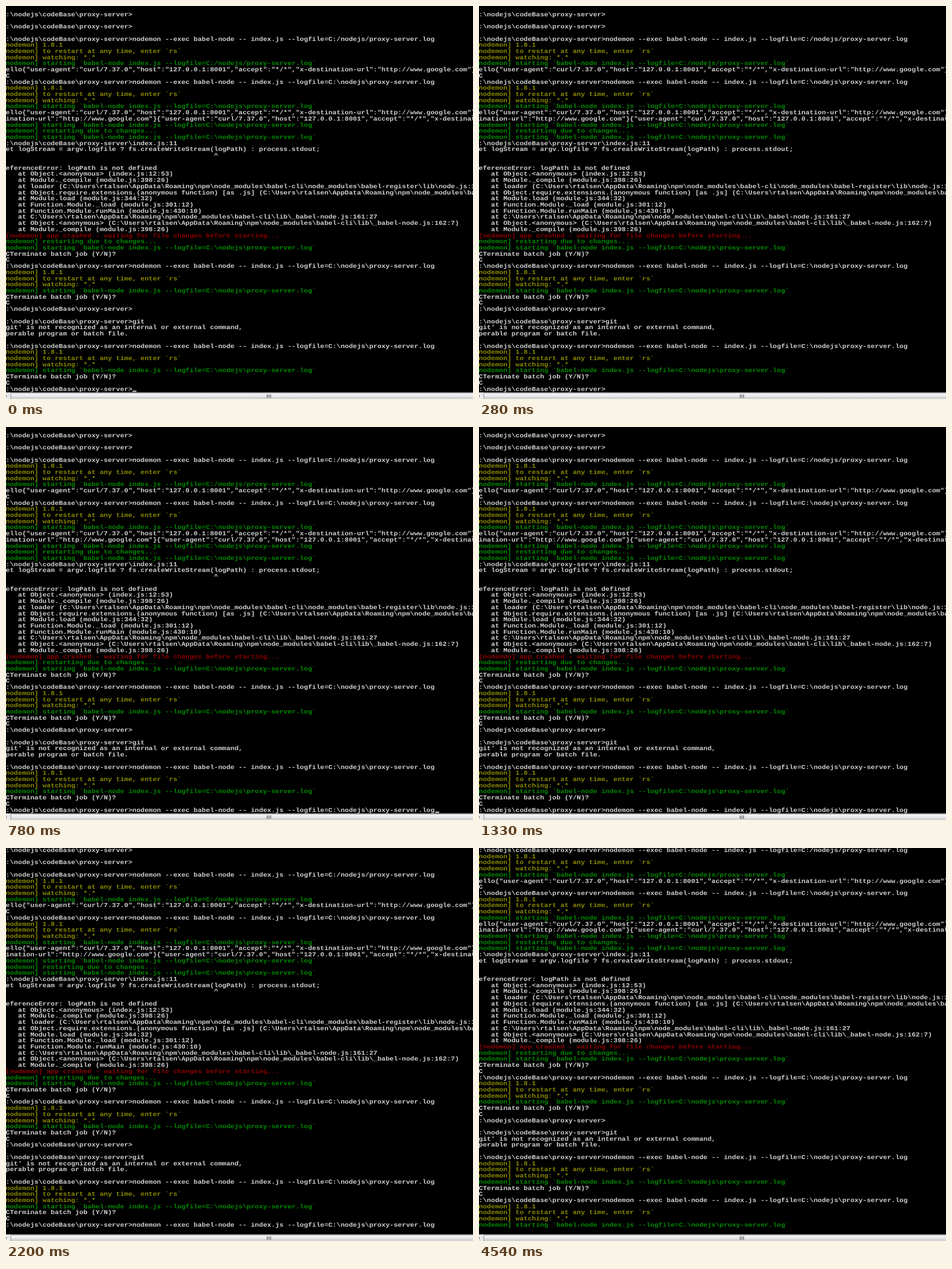
An HTML page that plays this animation: 816x686 px, repeating every 8 s.

```html
<!DOCTYPE html>
<html lang="en">
<head>
<meta charset="utf-8">
<title>Console</title>
<style>
  html, body { margin: 0; width: 100%; height: 100%; overflow: hidden; background: #000; }
  svg { display: block; width: 816px; height: 686px; }
  text {
    font: bold 11.908px "Liberation Mono", "DejaVu Sans Mono", monospace;
    white-space: pre;
    text-rendering: geometricPrecision;
  }
</style>
</head>
<body>
<svg viewBox="0 0 816 686" xmlns="http://www.w3.org/2000/svg">
  <defs>
    <linearGradient id="thumb" x2="0" y2="1">
      <stop offset="0" stop-color="#f6f6f6"/>
      <stop offset=".45" stop-color="#e8e8ea"/>
      <stop offset=".5" stop-color="#d8d8dc"/>
      <stop offset="1" stop-color="#c4c4c8"/>
    </linearGradient>
  </defs>
  <rect width="816" height="686" fill="#000"/>
  <g id="screen"></g>
  <rect id="cursor" y="671.4" width="7" height="2.1" fill="#d0d0d0"/>
  <g id="scrollbar">
    <rect y="674.5" width="816" height="12" fill="#e8e8ea"/>
    <rect x="8.5" y="675.5" width="820" height="14" rx="1.5" fill="url(#thumb)" stroke="#949498"/>
    <path d="M0 678.5V683.5L1.2 681Z" fill="#444"/>
    <path d="M456.5 678V684M459.5 678V684M462.5 678V684" stroke="#45454a" stroke-width="1.3"/>
    <path d="M457.7 678V684M460.7 678V684M463.7 678V684" stroke="#fff" stroke-width=".7"/>
  </g>
</svg>
<script>
const LOOP = 8000;
const COL = 7.146, ROW = 10.72, LEFT = -0.4, TOP = 8.75, BASE = 8.9;
const COLORS = { w: '#d0d0d0', y: '#8a8a00', g: '#008a00', r: '#8a0000' };
const raw = String.raw;

const prompt = raw`:\nodejs\codeBase\proxy-server>`;
const winLog = raw`--logfile=C:\nodejs\proxy-server.log`;
const unixLog = '--logfile=C:/nodejs/proxy-server.log';
const npm = raw`C:\Users\rtalsen\AppData\Roaming\npm\node_modules\babel-cli`;
const command = log => 'nodemon --exec babel-node -- index.js ' + log;
const request = '"user-agent":"curl/7.37.0","host":"127.0.0.1:8001","accept":"*/*",' +
  '"x-destination-url":"http://www.google.com"}';

const rows = [];
const put = (color, ...lines) => lines.forEach(line => rows.push([color, line]));
const say = (...lines) => put('w', ...lines);
const starting = (log = winLog) => put('g', 'nodemon] starting `babel-node index.js ' + log + '`');
const restarting = () => put('g', 'nodemon] restarting due to changes...');
const banner = log => {
  put('y', 'nodemon] 1.8.1', 'nodemon] to restart at any time, enter `rs`', 'nodemon] watching: *.*');
  starting(log);
};
const run = (log = winLog) => {
  say(prompt + command(log));
  banner(log);
};
const stop = () => say('CTerminate batch job (Y/N)?', 'C');
const trace = (...calls) => calls.forEach(call => say('   at ' + call));

say(prompt, '', prompt, '');
run(unixLog);
say('ello{' + request, 'C');
run();
say('ello{' + request, 'ination-url":"http://www.google.com"}{' + request);
starting();
restarting();
starting();
say(
  raw`:\nodejs\codeBase\proxy-server\index.js:11`,
  'et logStream = argv.logfile ? fs.createWriteStream(logPath) : process.stdout;',
  ' '.repeat(51) + '^',
  '',
  'eferenceError: logPath is not defined'
);
trace(
  'Object.<anonymous> (index.js:12:53)',
  'Module._compile (module.js:398:26)',
  'loader (' + npm + raw`\node_modules\babel-register\lib\node.js:128:5)`,
  'Object.require.extensions.(anonymous function) [as .js] (' + npm,
  'Module.load (module.js:344:32)',
  'Function.Module._load (module.js:301:12)',
  'Function.Module.runMain (module.js:430:10)',
  npm + raw`\lib\_babel-node.js:161:27`,
  'Object.<anonymous> (' + npm + raw`\lib\_babel-node.js:162:7)`,
  'Module._compile (module.js:398:26)'
);
put('r', '[nodemon] app crashed - waiting for file changes before starting...');
restarting();
starting();
stop();
run();
stop();
say(prompt, '', prompt + 'git',
  "git' is not recognized as an internal or external command,",
  'perable program or batch file.', '');
run();
stop();
const inputRow = rows.length;
run();

const screen = document.getElementById('screen');
const cursor = document.getElementById('cursor');

const lines = rows.map(([color, line], i) => {
  const el = document.createElementNS('http://www.w3.org/2000/svg', 'text');
  const y = TOP + i * ROW + BASE;
  // squat glyphs of the console's 8 by 12 cell
  el.setAttribute('transform', `translate(${LEFT} ${y.toFixed(2)}) scale(1 .89)`);
  el.setAttribute('fill', COLORS[color]);
  el.textContent = line;
  return screen.appendChild(el);
});

const show = (el, on) => el.setAttribute('visibility', on ? 'visible' : 'hidden');
const between = (t, from, to) => t >= from && t < to;

function draw(t) {
  const typed = t >= 650, started = t >= 4540;
  const scroll = started ? 5 : t >= 2200 ? 1 : 0;
  screen.setAttribute('transform', `translate(0 ${-scroll * ROW})`);

  const input = typed ? rows[inputRow][1] : prompt;
  if (lines[inputRow].textContent !== input) lines[inputRow].textContent = input;
  lines.slice(inputRow + 1).forEach(el => show(el, started));

  cursor.setAttribute('x', Math.round(LEFT + input.length * COL));
  show(cursor, t < 280 || between(t, 780, 1330) || between(t, 1760, 2200));
}

const start = performance.now();
function tick() {
  draw((performance.now() - start) % LOOP);
  requestAnimationFrame(tick);
}
tick();
</script>
</body>
</html>
```
